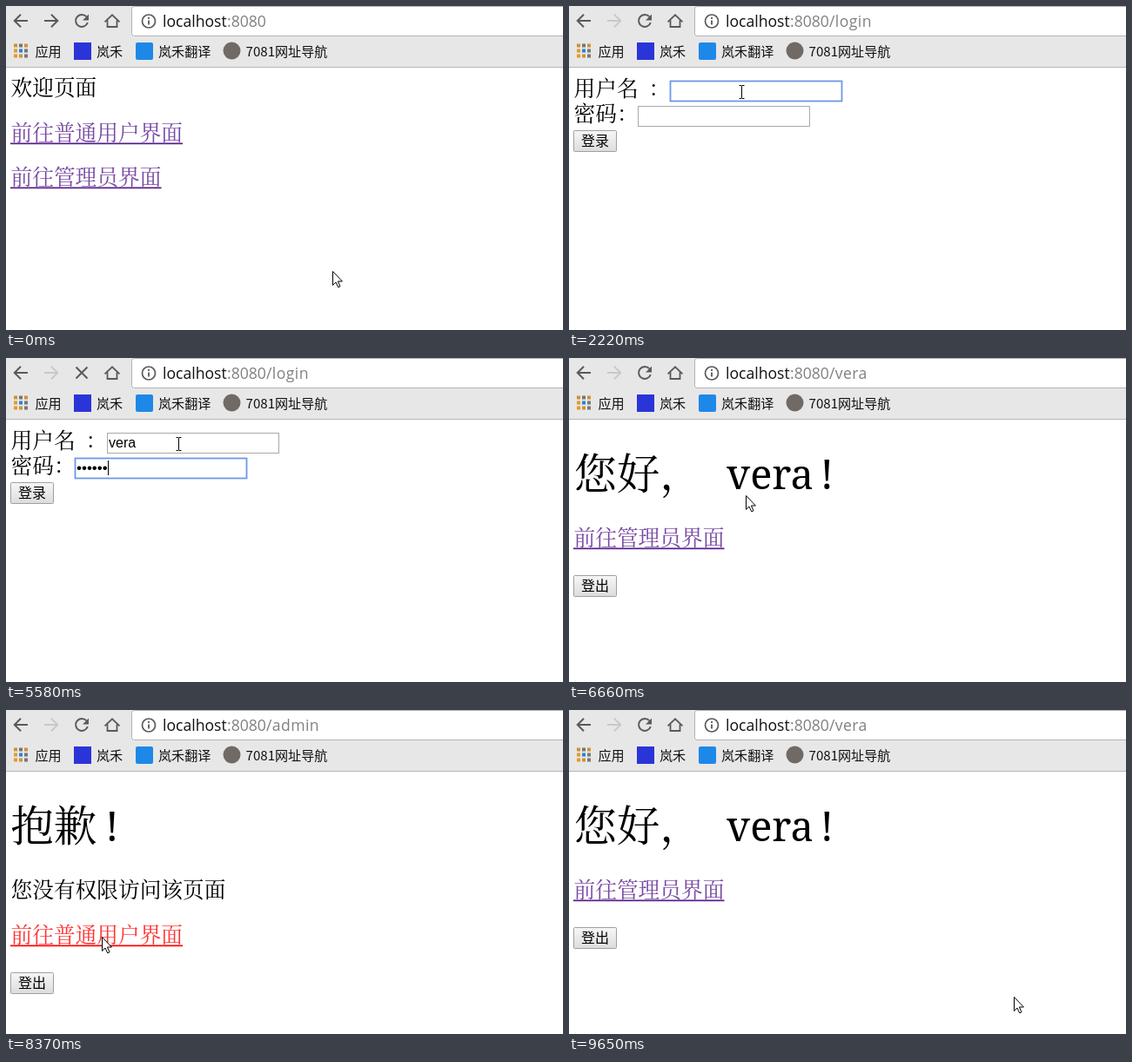
Write an HTML page that moves like this. It is 640 px wide and 373 px high and loops after 9.73 s.

```html
<!DOCTYPE html>
<html lang="zh">
<head>
<meta charset="utf-8">
<title>登录演示</title>
<style>
html, body { margin: 0; width: 100%; height: 100%; overflow: hidden; background: #fff; }
svg { display: block; width: 640px; height: 373px; }
text { white-space: pre; }
.page { font: 300 24.7px "Noto Serif CJK SC", "Noto Sans CJK SC", "Noto Sans CJK", serif; }
.page .big { font-size: 49.4px; font-weight: 500; }
.page .latin { font: 300 47px "Noto Serif", serif; }
.page .btn, .mark { font: 400 15.1px "Noto Sans CJK SC", "Noto Sans CJK", sans-serif; }
.page .btn { font-size: 16px; }
.page .field { font: 400 16px "Liberation Sans", Arial, sans-serif; }
.page .dots { font-size: 17px; }
.url { font: 17.6px "Open Sans", "Noto Sans", sans-serif; }
.path { letter-spacing: .4px; }
.link { fill: #551a8b; }
.link.active { fill: #f00; }
.link text { fill-opacity: .8; }
.icon { fill: none; stroke: #5a5a5a; stroke-width: 2; }
.box { fill: #fff; stroke: #a9a9a9; }
.box.focus { stroke: #6c98e6; stroke-width: 1.8; }
.pointer { fill: #fff; stroke: #000; stroke-linejoin: round; }
</style>
</head>
<body>
<svg viewBox="0 0 640 373">
  <defs>
    <linearGradient id="face" x2="0" y2="1">
      <stop stop-color="#f7f7f7"/><stop offset="1" stop-color="#dcdcdc"/>
    </linearGradient>
    <rect id="button" x="5.5" y=".5" width="49" height="24" rx="1" fill="url(#face)" stroke="#a0a0a0"/>
  </defs>

  <rect width="640" height="373" fill="#fff"/>
  <rect width="640" height="70" fill="#e7e7e7"/>
  <rect y="70" width="640" height="1" fill="#b6b6b6"/>
  <rect x="144.5" y=".5" width="510" height="34" rx="3" fill="#fff" stroke="#b2b2b2"/>

  <g class="icon">
    <path d="M25 17H10M17 9.7L9.7 17l7.3 7.3"/>
    <path id="forward" d="M44 17h15M52 9.7l7.3 7.3-7.3 7.3"/>
    <g id="reload">
      <path d="M92.3 12.2A7 7 0 1 0 93.8 19"/>
      <path d="M95 9.5v7h-7z" fill="#5a5a5a" stroke="none"/>
    </g>
    <path id="stop" d="M80.5 10.5l13 13M93.5 10.5l-13 13"/>
    <path d="M113.5 18.3l8.5-8 8.5 8M116.5 16.5v7.5h11v-7.5" stroke-width="1.8"/>
    <circle cx="164" cy="17.5" r="7.5" stroke-width="1.7"/>
    <path d="M164 16.5v5M164 13v2" stroke-width="1.8"/>
  </g>
  <g class="url">
    <text x="180" y="24" fill="#111">localhost</text>
    <text x="254" y="24" fill="#808080">:8080</text>
    <text id="path" class="path" x="299" y="24" fill="#808080"></text>
  </g>

  <g id="apps"></g>
  <rect x="78" y="42" width="20" height="20" fill="#2b34d8"/>
  <rect x="149" y="42" width="20" height="20" rx="2" fill="#1e88e8"/>
  <circle cx="259.5" cy="51.5" r="10" fill="#716a64"/>
  <g class="mark" fill="#111">
    <text x="33.5" y="58">应用</text>
    <text x="104" y="58">岚禾</text>
    <text x="175" y="58">岚禾翻译</text>
    <text x="275.5" y="58">7081网址导航</text>
  </g>

  <g id="home" class="page">
    <text x="5.5" y="103">欢迎页面</text>
    <g class="link" id="homeLink">
      <text x="5.5" y="155">前往普通用户界面</text>
      <rect x="5" y="157.5" width="198" height="1.7"/>
    </g>
    <g class="link">
      <text x="5.5" y="206">前往管理员界面</text>
      <rect x="5" y="208.5" width="173.5" height="1.7"/>
    </g>
  </g>

  <g id="login" class="page">
    <text x="5.5" y="104">用户名</text><text x="91.5" y="104">：</text>
    <text x="5.5" y="133">密码：</text>
    <rect id="nameBox" class="box" x="116.5" y="86.5" width="197" height="23"/>
    <rect id="passBox" class="box" x="79.5" y="115.5" width="197" height="23"/>
    <text id="name" class="field" x="118" y="103"></text>
    <text id="pass" class="field dots" x="81" y="132"></text>
    <rect id="caret" width="1" height="17"/>
    <use href="#button" y="143"/>
    <text class="btn" x="14" y="161">登录</text>
    <g id="popup">
      <rect x="116.5" y="111.5" width="198" height="31" fill="#fff" stroke="#b4b4b4"/>
      <text class="field" x="119" y="132">vera</text>
    </g>
  </g>

  <g id="profile" class="page">
    <text class="big" x="5.5" y="151">您好，</text>
    <text class="big latin" x="181" y="151">vera</text>
    <text class="big latin" x="288.5" y="151">!</text>
    <g class="link" id="profileLink">
      <text x="5.5" y="216">前往管理员界面</text>
      <rect x="5" y="218.5" width="173.5" height="1.7"/>
    </g>
    <use href="#button" y="250"/>
    <text class="btn" x="14" y="268">登出</text>
  </g>

  <g id="denied" class="page">
    <text class="big" x="5.5" y="151">抱歉</text>
    <text class="big latin" x="114" y="151">!</text>
    <text x="5.5" y="216">您没有权限访问该页面</text>
    <g class="link" id="deniedLink">
      <text x="5.5" y="268">前往普通用户界面</text>
      <rect x="5" y="270.5" width="198" height="1.7"/>
    </g>
    <use href="#button" y="302"/>
    <text class="btn" x="14" y="320">登出</text>
  </g>

  <g id="cursor">
    <path id="arrow" class="pointer" d="M.5 .5V16.5L4 13l2.7 5.8 2.3-1L6.4 12h5z"/>
    <path id="hand" class="pointer" d="M-1.7 13.5V2a1.7 1.7 0 0 1 3.4 0V9C2 7.6 5 7.6 5 9.8 5 8.4 8 8.6 8 10.6 8 9.4 10.8 9.6 10.8 12V16.5C10.8 19 9 20 9 23.5H0C0 21-2 19.5-3 17.5L-5.5 13.5C-5.8 11.5-3.500 11-1.700 13.5zM1.7 9v3.5M5 9.8v3M8 10.6v2.5"/>
    <path id="beam" d="M-3 -7.5h2.5l.5 1 .5-1H3M0 -6.5v13M-3 7.5h2.5l.5-1 .5 1H3" fill="none" stroke="#000"/>
  </g>
</svg>

<script>
const LOOP = 9730;
const el = id => document.getElementById(id);
const show = (id, on) => { el(id).style.display = on ? '' : 'none'; };
const within = (t, ...spans) => spans.some(([a, b]) => t >= a && t < b);
const ease = f => f < .5 ? 2 * f * f : 1 - 2 * (1 - f) * (1 - f);

const pages = [
  [0, 'home', ''], [1160, 'login', '/login'], [5660, 'profile', '/vera'],
  [7170, 'denied', '/admin'], [8450, 'profile', '/vera']
];
const nameKeys = [2530, 2590, 2820, 2900];
const passKeys = [4270, 4270, 4580, 4810, 5040, 5120];

// Cursor moves: a..b in n jumps, with the pointer shape for each place.
const moves = [
  { a: 420, b: 1000, n: 9, from: [375, 305], to: [171, 154],
    shape: (x, y) => y < 162 && x < 203 ? 'hand' : 'arrow' },
  { a: 1300, b: 1600, n: 5, from: [171, 154], to: [198, 99], rest: 'hand',
    shape: (x, y) => y > 139 ? 'arrow' : 'beam' },
  { a: 6500, b: 6880, n: 6, from: [198, 99], to: [134, 217], bend: 37, rest: 'beam',
    shape: (x, y) => y < 158 ? 'beam' : y < 194 ? 'arrow' : 'hand' },
  { a: 7420, b: 8000, n: 9, from: [134, 217], to: [110, 261], rest: 'hand',
    shape: (x, y) => y < 222 ? 'beam' : y < 247 ? 'arrow' : 'hand' },
  { a: 8910, b: 9070, n: 3, from: [110, 261], to: [536, 334], rest: 'hand', shape: () => 'arrow' },
  { a: 9210, b: 9650, n: 7, from: [536, 334], to: [511, 330], shape: () => 'arrow' }
];

const dotColors = ['#d0913a', '#777', '#d0913a', '#e39a2a', '#2f80d8', '#777', '#e39a2a', '#d0913a', '#777'];
el('apps').innerHTML = dotColors.map((c, i) =>
  `<rect x="${9 + i % 3 * 6}" y="${43.5 + Math.floor(i / 3) * 6}" width="4" height="4" fill="${c}"/>`).join('');

function drawCursor(t) {
  const m = moves.filter(v => t >= v.a).pop() || moves[0];
  const k = t < m.a ? 0 : Math.min(m.n, 1 + Math.floor((t - m.a) / (m.b - m.a) * (m.n - 1) + 1e-6));
  const f = ease(k / m.n);
  const x = Math.round(m.from[0] + (m.to[0] - m.from[0]) * f + (m.bend || 0) * 4 * f * (1 - f));
  const y = Math.round(m.from[1] + (m.to[1] - m.from[1]) * f);
  let shape = k ? m.shape(x, y) : m.rest || 'arrow';
  if (within(t, [8370, 8450])) shape = 'arrow';
  // The hand stays up after a page change until the next move.
  if (within(t, [8450, 8910])) shape = 'hand';
  for (const s of ['arrow', 'hand', 'beam']) show(s, s === shape);
  const half = shape === 'beam' ? .5 : 0;
  el('cursor').setAttribute('transform', `translate(${x + half} ${y})`);
}

function drawLogin(t) {
  const typed = keys => keys.filter(k => t >= k).length;
  const inPass = t >= 3510;
  el('name').textContent = 'vera'.slice(0, typed(nameKeys));
  el('pass').textContent = '•'.repeat(typed(passKeys));
  el('nameBox').classList.toggle('focus', t >= 1680 && !inPass);
  el('passBox').classList.toggle('focus', inPass);
  show('popup', within(t, [2590, 3510]));
  show('caret', within(t, [1680, 2220], [2530, 3440], [3510, 3960], [4270, 5660]));
  const field = el(inPass ? 'pass' : 'name');
  const width = field.textContent ? field.getComputedTextLength() : 0;
  el('caret').setAttribute('x', Math.round((inPass ? 81 : 118) + width));
  el('caret').setAttribute('y', inPass ? 118 : 90);
}

function draw(t) {
  const [, page, path] = pages.filter(p => t >= p[0]).pop();
  for (const id of ['home', 'login', 'profile', 'denied']) show(id, id === page);
  el('path').textContent = path;
  el('forward').style.stroke = page === 'home' ? '' : '#c9c9c9';
  const loading = within(t, [5580, 5660]);
  show('stop', loading);
  show('reload', !loading);
  el('homeLink').classList.toggle('active', within(t, [1080, 1160]));
  el('profileLink').classList.toggle('active', within(t, [7110, 7170]));
  el('deniedLink').classList.toggle('active', within(t, [8310, 8450]));
  if (page === 'login') drawLogin(t);
  drawCursor(t);
}

const start = performance.now();
function tick() {
  draw((performance.now() - start) % LOOP);
  requestAnimationFrame(tick);
}
tick();
</script>
</body>
</html>
```
